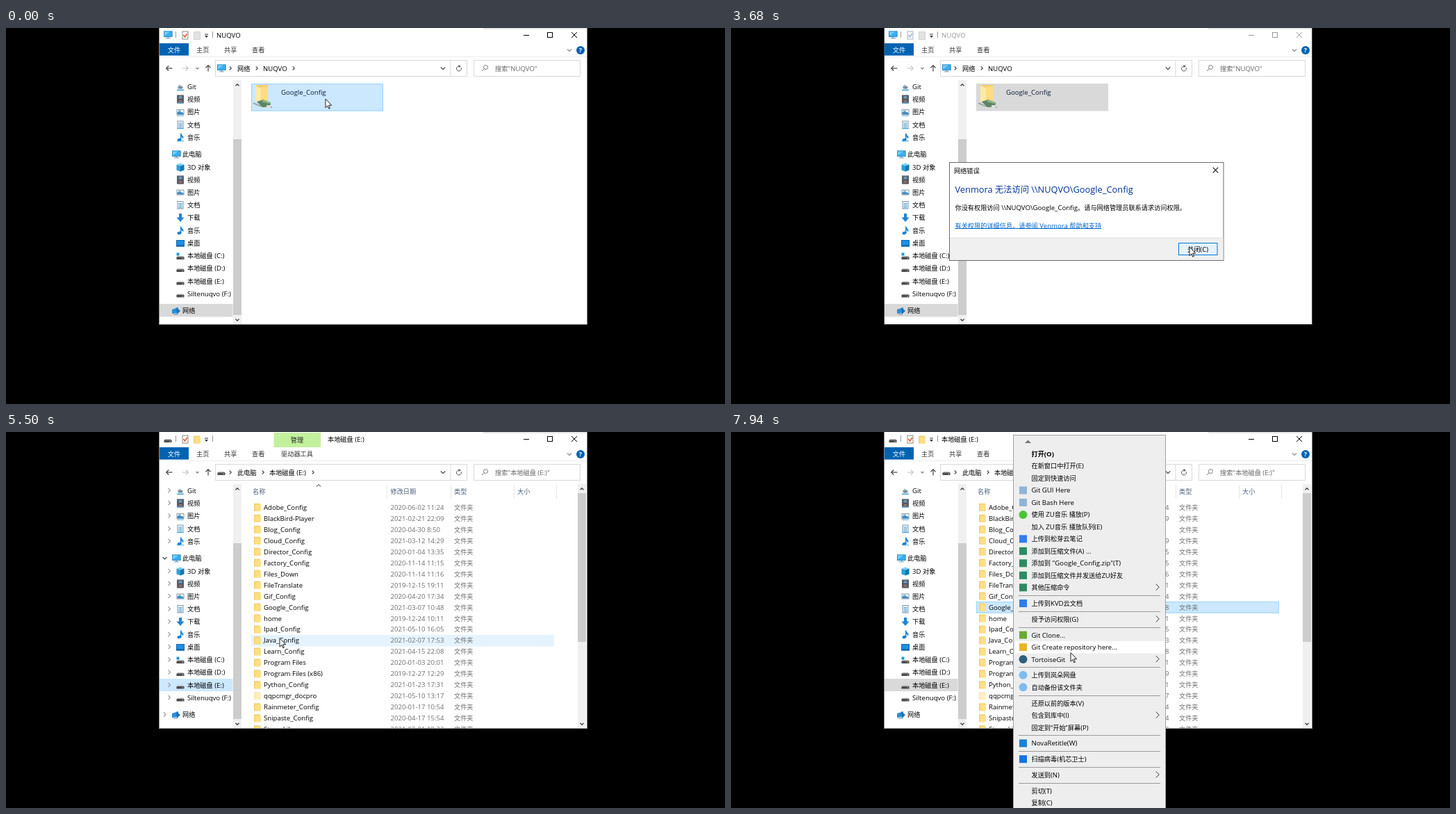
Recreate the animation shown at these times as an HTML page with a canvas. Size 1035 by 541 pixels, loop 8 s.

```html
<!DOCTYPE html>
<html lang="zh-CN">
<head>
<meta charset="utf-8">
<title>Explorer</title>
<style>
html, body { margin: 0; width: 100%; height: 100%; overflow: hidden; background: #000; }
canvas { display: block; }
</style>
</head>
<body>
<canvas id="stage" width="1035" height="541"></canvas>
<script>
const ctx = document.getElementById('stage').getContext('2d');
const LOOP = 8000;
const FONT = '"Open Sans", "Noto Sans CJK SC", "Noto Sans CJK", sans-serif';
const HAN_SCALE = 0.957;
const HOST = 'NUQVO';
const BLUE = '#2196e3';

// Cursor path: time, x, y
const PATH = [
  [0, 460, 102], [220, 458, 106], [420, 452, 117], [620, 447, 127], [1020, 472, 168],
  [1220, 522, 248], [1440, 536, 262], [1640, 553, 276], [1840, 570, 288], [2040, 587, 297],
  [2260, 602, 304], [2460, 625, 310], [2660, 641, 312], [2860, 653, 314], [3080, 660, 314],
  [3480, 660, 315], [4700, 560, 324], [4900, 400, 346], [5100, 290, 362], [5300, 312, 352],
  [5500, 394, 296.5], [5700, 399, 274], [5900, 404, 256], [6100, 407, 250], [6300, 406.5, 246],
  [7520, 430, 270], [7740, 462, 298], [7940, 489, 317.5]
];

const SIDEBAR = [
  ['Git', 84, 'share'], ['视频', 102, 'film'], ['图片', 120.5, 'photo'], ['文档', 139, 'doc'], ['音乐', 157, 'note'],
  ['此电脑', 181.5, 'monitor'], ['3D 对象', 200, 'cube'], ['视频', 218, 'film'], ['图片', 236, 'photo'],
  ['文档', 254.5, 'doc'], ['下载', 272.5, 'down'], ['音乐', 291, 'note'], ['桌面', 309, 'desk'],
  ['本地磁盘 (C:)', 327.5, 'system'], ['本地磁盘 (D:)', 345.5, 'drive'], ['本地磁盘 (E:)', 364, 'drive'],
  ['Siltenuqvo (F:)', 382, 'drive'], ['网络', 406.5, 'network']
];

const FILES = `Adobe_Config|2020-06-02 11:24
BlackBird-Player|2021-02-21 22:09
Blog_Config|2020-04-30 8:50
Cloud_Config|2021-03-12 14:29
Director_Config|2020-01-04 13:35
Factory_Config|2020-11-14 11:15
Files_Down|2020-11-14 11:16
FileTranslate|2019-12-15 19:11
Gif_Config|2020-04-20 17:34
Google_Config|2021-03-07 10:48
home|2019-12-24 10:11
Ipad_Config|2021-05-10 16:05
Java_Config|2021-02-07 17:53
Learn_Config|2021-04-15 22:08
Program Files|2020-01-03 20:01
Program Files (x86)|2019-12-27 12:29
Python_Config|2021-01-23 17:31
qqpcmgr_docpro|2021-05-10 13:17
Rainmeter_Config|2020-01-17 10:54
Snipaste_Config|2020-04-17 15:54
Store_Lib|2021-03-01 18:22`.split('\n').map(row => row.split('|'));

// Groups of menu entries: label, badge colour, badge is round, has submenu
const MENU = [
  [['打开(O)'], ['在新窗口中打开(E)'], ['固定到快速访问'], ['Git GUI Here', '#8fb4d6'], ['Git Bash Here', '#8fb4d6'],
   ['使用 ZU音乐 播放(P)', '#4fc436', 1], ['加入 ZU音乐 播放队列(E)'], ['上传到松芽云笔记', '#2f7df0'],
   ['添加到压缩文件(A) ...', '#2f8a62'], ['添加到 "Google_Config.zip"(T)', '#2f8a62'],
   ['添加到压缩文件并发送给ZU好友', '#2f8a62'], ['其他压缩命令', '#2f8a62', 0, 1]],
  [['上传到KVD云文档', '#2b7de9']],
  [['授予访问权限(G)', '', 0, 1]],
  [['Git Clone...', '#6da832'], ['Git Create repository here...', '#e9b52e'], ['TortoiseGit', '#2d6178', 1, 1]],
  [['上传到岚朵网盘', '#7ebcf0', 1], ['自动备份该文件夹', '#7ebcf0', 1]],
  [['还原以前的版本(V)'], ['包含到库中(I)', '', 0, 1], ['固定到“开始”屏幕(P)']],
  [['NovaRetitle(W)', '#1f7fd0']],
  [['扫描病毒(机芯卫士)', '#1673e0']],
  [['发送到(N)', '', 0, 1]],
  [['剪切(T)'], ['复制(C)']]
];

function box(x, y, w, h, fill, stroke, lw = 1) {
  if (fill) { ctx.fillStyle = fill; ctx.fillRect(x, y, w, h); }
  if (stroke) {
    ctx.strokeStyle = stroke; ctx.lineWidth = lw;
    ctx.strokeRect(x + lw / 2, y + lw / 2, w - lw, h - lw);
  }
}

// Chinese runs are set slightly smaller than Latin ones; returns the width
function text(s, x, y, color = '#000', size = 9.6, align = 'left', weight = '') {
  const runs = s.match(/[\x00-\xff]+|[^\x00-\xff]+/g).map(part => {
    const scale = part.charCodeAt(0) > 255 ? HAN_SCALE : 1;
    const font = `${weight} ${size * scale}px ${FONT}`;
    ctx.font = font;
    return { part, font, width: ctx.measureText(part).width };
  });
  const total = runs.reduce((sum, run) => sum + run.width, 0);
  if (align === 'center') x -= total / 2;
  ctx.fillStyle = color;
  for (const run of runs) {
    ctx.font = run.font;
    ctx.fillText(run.part, x, y + size * 0.365);
    x += run.width;
  }
  return total;
}

function trace(points) {
  ctx.beginPath();
  points.forEach(([x, y], i) => i ? ctx.lineTo(x, y) : ctx.moveTo(x, y));
}

function line(points, color, lw = 1) {
  trace(points);
  ctx.strokeStyle = color; ctx.lineWidth = lw;
  ctx.stroke();
}

function poly(points, fill) {
  trace(points);
  ctx.fillStyle = fill;
  ctx.fill();
}

function disc(x, y, r, fill) {
  ctx.beginPath();
  ctx.arc(x, y, r, 0, 7);
  ctx.fillStyle = fill;
  ctx.fill();
}

const DIRS = { right: [1, 0], left: [-1, 0], down: [0, 1], up: [0, -1] };

function chevron(x, y, dir, color = '#444', r = 2.5, lw = 1.1) {
  const [dx, dy] = DIRS[dir], k = r / 2;
  line([[x - dx * k - dy * r, y - dy * k - dx * r], [x + dx * k, y + dy * k],
    [x - dx * k + dy * r, y - dy * k + dx * r]], color, lw);
}

function arrow(x, y, dir, color) {
  const [dx, dy] = DIRS[dir], r = 4.5;
  line([[x - dx * r, y - dy * r], [x + dx * r, y + dy * r]], color, 1.2);
  chevron(x + dx * 2.5, y + dy * 2.5, dir, color, 3.5, 1.2);
}

function cross(x, y, r, color, lw = 1) {
  line([[x - r, y - r], [x + r, y + r]], color, lw);
  line([[x + r, y - r], [x - r, y + r]], color, lw);
}

const icons = {
  monitor(x, y) {
    box(x - 6, y - 5.5, 12.5, 8.5, '#37aef0', '#3a8cc0');
    poly([[x - 5, y - 4.5], [x + 3, y - 4.5], [x - 5, y + 1.5]], '#74ccf8');
    box(x - 1, y + 3, 2.5, 1.5, '#9db4c3');
    box(x - 3.5, y + 4.3, 7.5, 1, '#6f9cba');
  },
  network(x, y) {
    poly([[x - 6, y - 2], [x + 3, y - 5], [x + 3, y + 3], [x - 6, y + 4]], '#2b8fd8');
    poly([[x, y - 5], [x + 6, y], [x + 1, y + 5]], '#1d72b8');
    box(x - 4, y + 4.5, 6, 1, '#5b8db0');
  },
  share(x, y) {
    poly([[x - 5, y + 1], [x - 1, y - 3], [x + 5, y + 1]], '#a7b1b8');
    box(x - 3, y, 6, 3, '#6e8ba0');
    box(x - 5, y + 4, 10, 1.3, '#45a7e4');
  },
  film(x, y) {
    box(x - 5, y - 6, 10, 12, '#343a45');
    box(x - 2.5, y - 5, 5, 4.5, '#6f97b5');
    box(x - 2.5, y + 0.5, 5, 4.5, '#8a6f6a');
    for (let i = -5; i < 6; i += 2.5) {
      box(x - 4.4, y + i, 1, 1.2, '#ddd');
      box(x + 3.4, y + i, 1, 1.2, '#ddd');
    }
  },
  photo(x, y) {
    box(x - 5.5, y - 4, 11, 8, '#f5f9fb', '#8e9ba4');
    poly([[x - 4.5, y + 3], [x - 4.5, y], [x - 1, y - 1], [x + 4.5, y + 1], [x + 4.5, y + 3]], '#3a8cc4');
    box(x - 3, y - 2.5, 4, 1.5, '#7abbe0');
  },
  doc(x, y) {
    box(x - 4.5, y - 6, 9, 11.5, '#f4faff', '#7e98ac');
    for (let i = -3; i < 4; i += 2) box(x - 2.5, y + i, 5, 1, '#4a9ad0');
  },
  note(x, y) {
    ctx.beginPath();
    ctx.ellipse(x - 1.5, y + 3.5, 3, 2.2, -0.3, 0, 7);
    ctx.fillStyle = '#1481d4';
    ctx.fill();
    box(x, y - 6, 1.5, 9.5, '#1481d4');
    poly([[x, y - 6], [x + 4.5, y - 1], [x + 4, y + 2], [x + 1, y - 2]], '#1481d4');
  },
  cube(x, y) {
    poly([[x - 5.5, y - 4], [x, y - 6], [x + 5.5, y - 4], [x, y - 2]], '#7ad2ee');
    poly([[x - 5.5, y - 4], [x, y - 2], [x, y + 6], [x - 5.5, y + 4]], '#28a3d4');
    poly([[x + 5.5, y - 4], [x, y - 2], [x, y + 6], [x + 5.5, y + 4]], '#1676b4');
  },
  down(x, y) {
    poly([[x - 2, y - 6], [x + 2, y - 6], [x + 2, y - 0.5], [x + 5.5, y - 0.5], [x, y + 6],
      [x - 5.5, y - 0.5], [x - 2, y - 0.5]], '#1f84d6');
  },
  desk(x, y) {
    box(x - 6, y - 4.5, 12, 9.5, '#1e90e6', '#1568ac');
    box(x - 5, y + 3, 10, 1, '#0e4f86');
  },
  drive(x, y) {
    poly([[x - 4, y], [x + 4, y], [x + 5.5, y + 2], [x - 5.5, y + 2]], '#b8b8b8');
    box(x - 5.5, y + 1.5, 11, 3.5, '#4b4b4b');
    box(x + 2.5, y + 3, 1.5, 1, '#b6e3b2');
  },
  system(x, y) {
    icons.drive(x, y);
    box(x - 5.5, y - 4.5, 4, 4, BLUE);
  }
};

function folder(x, y, pale) {
  box(x - 5, y - 5.5, 9, 11, pale ? '#f6e6ae' : '#f3cf6b');
  box(x - 3.5, y - 4, 8.5, 9.5, pale ? '#fff0c0' : '#ffdf87');
}

function titleBar(s) {
  const ink = s.active ? '#000' : '#999';
  (s.drive ? icons.drive : icons.monitor)(233, 10);
  box(244, 5, 1, 9, '#999');
  box(297, 5, 1, 9, '#999');
  const live = s.drive || s.t < 420;
  box(253.5, 4.5, 9, 12, '#fafafa', live ? '#8c8c8c' : '#a9b5cc');
  line([[255.5, 10], [257.5, 13], [261, 8]], live ? '#e0592a' : '#a5b4d4', 1.5);
  if (s.drive) folder(275, 11);
  else box(270, 5, 10, 12, '#e2e2e2', '#d0d0d0');
  box(286, 8.5, 5, 1, '#333');
  poly([[286, 11], [291, 11], [288.5, 14]], '#333');

  if (s.tools) {
    box(385.5, 1, 67.5, 21, '#c3f09d');
    text('管理', 419, 11.5, '#222', 9.6, 'center');
    text('驱动器工具', 419, 31.5, '#333', 9.6, 'center');
  }
  text(s.drive ? '本地磁盘 (E:)' : HOST, s.tools ? 463 : 303, 10.5, ink);
  box(745, 10, 8, 1, ink);
  box(779, 6, 8, 8, '', ink);
  cross(818, 10, 4, ink);
  const shade = ctx.createLinearGradient(0, 0, 0, 3);
  shade.addColorStop(0, '#dcdcdc');
  shade.addColorStop(1, '#fff');
  box(687, 0, 149, 3, shade);

  box(221, 22, 42, 17.6, '#0063b1');
  text('文件', 242, 31, '#fff', 9.6, 'center');
  ['主页', '共享', '查看'].forEach((tab, i) => text(tab, 274 + i * 40, 31.5, '#333'));
  chevron(811, 32, 'down', '#888', 3);
  disc(827, 32, 6, '#0063b1');
  text('?', 827, 32, '#fff', 9, 'center', 'bold');
  box(221, 41, 615, 1, '#ececec');
}

function addressBar(s) {
  arrow(235, 58, 'left', '#444');
  arrow(258, 58, 'right', '#c8c8c8');
  chevron(275.5, 58, 'down', '#777', 2);
  arrow(291, 58, 'up', '#444');
  box(301, 46, 363, 24, s.loading ? '#f2f2f2' : '#fff', '#d9d9d9');
  if (s.loading) box(302, 47, 69, 22, '#86d793');
  box(639.5, 46, 1, 24, '#d9d9d9');
  chevron(629, 58, 'down', '#444', 3.2, 1.3);
  if (s.loading) cross(652, 58.5, 3, '#555', 1.3);
  else {
    ctx.beginPath();
    ctx.arc(652, 58.5, 3.5, -0.4, 4.6);
    ctx.strokeStyle = '#555';
    ctx.lineWidth = 1;
    ctx.stroke();
    poly([[651.5, 53], [655, 55], [651.5, 57]], '#555');
  }
  chevron(323, 58, 'right');
  if (s.drive) {
    icons.drive(310, 57);
    text('此电脑', 333, 58);
    chevron(370, 58, 'right');
    text('本地磁盘 (E:)', 379, 58);
    chevron(442, 58, 'right');
  } else {
    icons.monitor(310, 58);
    text('网络', 333, 58);
    chevron(361, 58, 'right');
    text(HOST, 370, 58);
    if (s.active && !s.loading) chevron(414, 58, 'right');
  }
  box(673, 46, 154, 24, '#fff', '#d9d9d9');
  ctx.beginPath();
  ctx.arc(690.5, 56.5, 3, 0, 7);
  ctx.strokeStyle = '#777';
  ctx.stroke();
  line([[688.3, 58.7], [685, 62]], '#777');
  text(`搜索"${s.drive ? '本地磁盘 (E:)' : HOST}"`, 704, 58.5, '#666');
}

function scrollbar(x, thumbTop, thumbEnd) {
  box(x, 75, 12, 351, '#f0f0f0');
  box(x, thumbTop, 12, thumbEnd - thumbTop, '#cdcdcd');
  chevron(x + 6, 82, 'up', '#444', 2.5, 1.4);
  chevron(x + 6, 420, 'down', '#444', 2.5, 1.4);
}

function sidebar(s) {
  if (s.drive) box(221, 355, 105.5, 18, s.selected ? '#d9d9d9' : '#cce8ff');
  else {
    box(221, 397, 105.5, 18.5, '#d9d9d9');
    if (s.t >= 5100) box(221, 355, 105.5, 18, '#e5f3ff');
  }
  SIDEBAR.forEach(([label, y, icon], i) => {
    const root = icon === 'monitor' || icon === 'network';
    icons[icon](root ? 245 : 251, y + 0.5);
    if (i < 5) box(246, y + 5.2, 10, 1, '#45a7e4');
    text(label, root ? 254 : 261, y);
    if (!s.expanders) return;
    if (icon === 'monitor') chevron(228.5, y, 'down', '#404040', 3);
    else chevron(root ? 228.5 : 235, y, 'right', '#999', 3);
  });
  scrollbar(327, 160, 413);
}

function sharedFolder(s) {
  if (s.active) box(353, 80, 190, 39.5, '#cce8ff', '#99d1ff');
  else box(353, 80, 190, 39.5, '#d9d9d9');
  poly([[359, 83], [362, 82], [377, 82], [377, 105], [359, 105]], '#f2cb63');
  poly([[359, 83], [367, 86], [367, 109], [359, 105]], '#ffe9a6');
  box(367, 84, 10, 20, '#ffdc80');
  line([[356, 108], [365, 112], [383, 114]], '#9caaa8', 2);
  poly([[361, 106], [370, 103], [381, 108], [380, 113], [369, 114]], '#5d8463');
  poly([[370, 103], [381, 107], [379, 109], [368, 106]], '#8eb08e');
  box(375, 111, 6, 4, '#d8dedb');
  text('Google_Config', 396, 92.5, '#0a1a3c');
}

function fileList(s) {
  [['名称', 355], ['修改日期', 553.5], ['类型', 645], ['大小', 736]].forEach(([label, x]) => text(label, x, 85.5, '#4c607a'));
  [548, 640, 731, 792].forEach(x => box(x, 76, 1, 20, '#e5e5e5'));
  chevron(450, 77, 'up', '#777', 3);
  const hover = s.x > 353 && !s.menu ? Math.round((s.y - 108) / 16) : -1;
  FILES.forEach(([name, date], i) => {
    const y = 108.3 + i * 15.97;
    const top = Math.round(y) - 8;
    if (s.selected && i === 9) box(353, top, 436, 16.6, '#cce8ff', '#99d1ff');
    else if (i === hover) box(353, top, 436, 16.6, '#e5f3ff');
    folder(362, y, i === 17);
    text(name, 371, y);
    text(date, 553.5, y, '#6d6d6d');
    text('文件夹', 645, y, '#6d6d6d');
  });
  scrollbar(823, 88, 302);
}

function explorer(s) {
  box(220, 0, 617, 427, s.active ? '#8c8c8c' : '#4a4a4a');
  ctx.save();
  ctx.beginPath();
  ctx.rect(221, 0, 615, 426);
  ctx.clip();
  box(221, 0, 615, 426, '#fff');
  titleBar(s);
  addressBar(s);
  sidebar(s);
  (s.drive ? fileList : sharedFolder)(s);
  ctx.restore();
}

function dialog(s) {
  ctx.save();
  if (s.loading) {
    ctx.globalAlpha = 0.045;
    ctx.translate(512, 264);
    ctx.scale(0.953, 0.953);
    ctx.translate(-512, -264);
  }
  box(314, 193, 395.5, 142, '#fff', '#6b6b6b');
  box(315, 302, 393.5, 32, '#f0f0f0');
  box(315, 301.5, 393.5, 1, '#dfdfdf');
  text('网络错误', 321, 205);
  cross(697.5, 204.5, 3.8, '#111', 1.1);
  text(`Venmora 无法访问 \\\\${HOST}\\Google_Config`, 322.5, 232.3, '#003399', 12.8);
  text(`你没有权限访问 \\\\${HOST}\\Google_Config。请与网络管理员联系请求访问权限。`, 322.5, 258.2);
  const linkWidth = text('有关权限的详细信息，请参阅 Venmora 帮助和支持', 322.5, 284, '#0066cc');
  box(322.5, 288, linkWidth, 1, '#0066cc');
  const hover = s.x > 644 && s.y > 309;
  const pressed = s.t >= 4280;
  box(644, 309, 56.5, 18, pressed ? '#cce4f7' : hover ? '#e5f1fb' : '#e1e1e1', pressed ? '#005499' : '#0078d7', hover ? 1 : 1.7);
  text('关闭(C)', 672, 318, '#000', 9.6, 'center');
  ctx.restore();
}

function contextMenu(s) {
  box(406, 4, 220, 540, '#eee', '#a0a0a0');
  poly([[423, 16], [432, 16], [427.5, 11.5]], '#777');
  let y = 31.5;
  MENU.forEach((group, g) => {
    if (g) {
      box(414, Math.round(y - 6.3), 204, 1, '#9b9b9b');
      y += 5.3;
    }
    group.forEach(([label, color, round, sub], i) => {
      if (s.x > 407 && Math.abs(s.y - y) < 8.75) box(409, Math.round(y - 8.7), 216, 17.5, '#fff');
      if (color && round) disc(420.5, y, 6, color);
      else if (color) box(415, y - 5.5, 11, 11, color);
      text(label, 432.5, y, '#000', 9.6, 'left', g + i ? '' : 'bold');
      if (sub) chevron(614, y - 0.5, 'right', '#333', 4.5, 1);
      y += 17.48;
    });
  });
}

function pointer(s) {
  if (s.busy) {
    disc(s.x, s.y, 8, '#2390e2');
    ctx.beginPath();
    ctx.arc(s.x, s.y, 6, s.t / 200, s.t / 200 + 1.6);
    ctx.strokeStyle = '#62bdf5';
    ctx.lineWidth = 3;
    ctx.stroke();
    disc(s.x, s.y, 3.8, '#fff');
    return;
  }
  const shape = [[0, 0], [0, 17], [4, 13.2], [6.6, 19], [9, 18], [6.4, 12.2], [12, 12.2]];
  trace(shape.map(([x, y]) => [s.x + x * 0.72, s.y + y * 0.75]));
  ctx.closePath();
  ctx.fillStyle = '#fff';
  ctx.fill();
  ctx.strokeStyle = '#222';
  ctx.lineWidth = 1;
  ctx.stroke();
}

function stateAt(t) {
  const [, x, y] = PATH.findLast(p => p[0] <= t);
  return {
    t, x, y,
    active: t < 420 || t >= 4500,
    busy: t >= 420 && t < 1220,
    dialog: t >= 620 && t < 4700,
    loading: t >= 4500 && t < 4700,
    drive: t >= 5300,
    tools: t >= 5300 && t < 6300,
    selected: t >= 6300,
    expanders: t >= 5100 && t < 7320,
    menu: t >= 7320
  };
}

function draw(now) {
  const s = stateAt(now % LOOP);
  box(0, 0, 1035, 541, '#000');
  explorer(s);
  if (s.dialog) dialog(s);
  if (s.menu) contextMenu(s);
  pointer(s);
}

let start;
function tick(now) {
  start ??= now;
  draw(now - start);
  requestAnimationFrame(tick);
}
draw(0);
requestAnimationFrame(tick);
</script>
</body>
</html>
```
